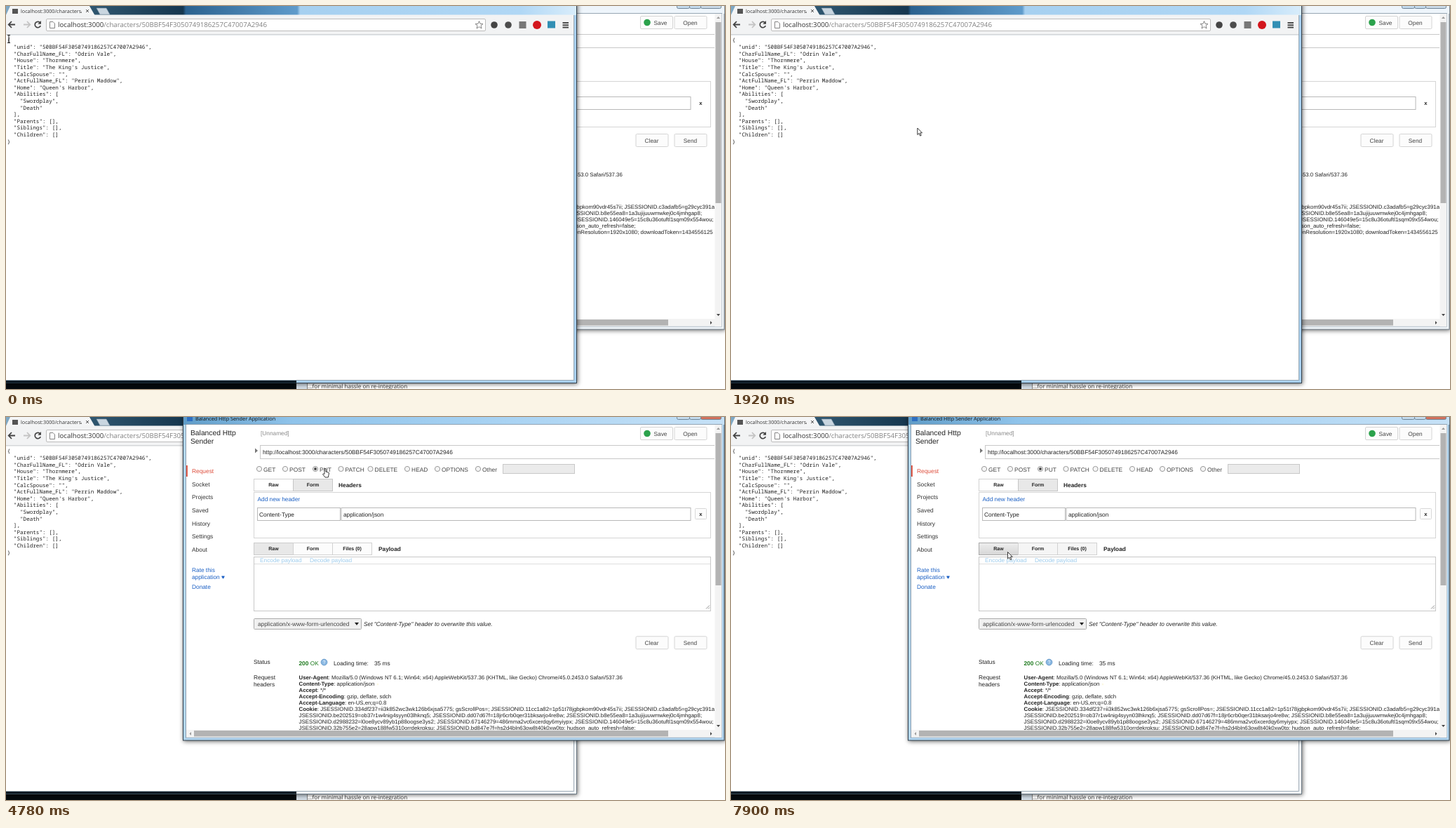
Write an HTML page that moves like this. It is 1025x546 px and loops after 7990 ms.

```html
<!DOCTYPE html>
<html lang="en">
<head>
<meta charset="utf-8">
<title>Request walkthrough</title>
<style>
html, body { margin: 0; width: 100%; height: 100%; overflow: hidden; background: #fff; }
svg { display: block; width: 100%; height: 100%; }
text { white-space: pre; text-rendering: geometricPrecision; font-family: "Liberation Sans", Arial, sans-serif; }
.ui { font-family: "Open Sans", "Noto Sans", sans-serif; }
.mono { font-family: "Noto Sans Mono", "DejaVu Sans Mono", monospace; font-weight: 500; }
.shadow { filter: drop-shadow(1px 1px 3px rgba(0,0,0,.6)); }
</style>
</head>
<body>
<svg viewBox="0 0 1025 546" xmlns="http://www.w3.org/2000/svg">
  <defs>
    <linearGradient id="strip" gradientUnits="userSpaceOnUse" x1="0" x2="814" y1="0" y2="0">
      <stop offset="0" stop-color="#7fa9c6"/><stop offset=".15" stop-color="#2f566f"/>
      <stop offset=".31" stop-color="#16374f"/><stop offset=".315" stop-color="#2b628f"/>
      <stop offset=".51" stop-color="#5f9bcb"/>
      <stop offset=".515" stop-color="#a6d0f0"/><stop offset=".9" stop-color="#b0d7f5"/>
      <stop offset="1" stop-color="#d9edfb"/>
    </linearGradient>
    <linearGradient id="titlebar">
      <stop offset="0" stop-color="#5f9cc8"/><stop offset=".2" stop-color="#8fc3ea"/>
      <stop offset=".6" stop-color="#a9d3f3"/><stop offset="1" stop-color="#c6e1f6"/>
    </linearGradient>
    <linearGradient id="pressed" x2="0" y2="1">
      <stop offset="0" stop-color="#eee"/><stop offset="1" stop-color="#d6d6d6"/>
    </linearGradient>
    <clipPath id="page"><rect x="257" y="11" width="753" height="435"/></clipPath>
    <clipPath id="tabTitle"><rect x="20" y="0" width="88" height="14"/></clipPath>
  </defs>
  <g id="desktop"></g>
  <g id="scene"></g>
  <g id="pointer"></g>
</svg>
<script>
const LOOP = 7990;
const CLIENT_RAISED = 2950, PUT_CHOSEN = 4780, RAW_HOVERED = 7560;
const BLUE = '#1a5fc4', GREY = '#444';
const ROW_TOP = 43.7, ROW_HEIGHT = 9.62, CHAR_WIDTH = 4.58;
const RECORD_ID = '50BBF54F3050749186257C47007A2946';

const json = `{
  "unid": "${RECORD_ID}",
  "CharFullName_FL": "Odrin Vale",
  "House": "Thornmere",
  "Title": "The King's Justice",
  "CalcSpouse": "",
  "ActFullName_FL": "Perrin Maddow",
  "Home": "Queen's Harbor",
  "Abilities": [
    "Swordplay",
    "Death"
  ],
  "Parents": [],
  "Siblings": [],
  "Children": []
}`.split('\n');

const requestHeaders = `User-Agent: Mozilla/5.0 (Windows NT 6.1; Win64; x64) AppleWebKit/537.36 (KHTML, like Gecko) Chrome/45.0.2453.0 Safari/537.36
Content-Type: application/json ♀
Accept: */*
Accept-Encoding: gzip, deflate, sdch
Accept-Language: en-US,en;q=0.8`.split('\n');

const cookieHeader = `Cookie: JSESSIONID.334df237=ii3k852wc3wk126b6xjsa5775; gsScrollPos=; JSESSIONID.11cc1a82=1p51t78jgbpkom90vdr45s7ii; JSESSIONID.c3adafb5=g29cyc391ar
JSESSIONID.be202519=ob37r1w4nig4syyn03lhknq5; JSESSIONID.dd07d67f=18jr6crb0qer31bksarjo4re8w; JSESSIONID.b8e55ea8=1a3ujijuuwmwkej0c4jmhgap8;
JSESSIONID.d2988232=l0oe8ycv89yb1p88oogse3ys2; JSESSIONID.67146279=486mma2vc6xcerdqy6myiypx; JSESSIONID.146049e5=15c8u36otuftl1sqm09x554wou;
JSESSIONID.32b755e2=28apw188fw5310orrdekrqksu; JSESSIONID.bd847e7f=hs2d4bln63ow8t40k0xw0tp; hudson_auto_refresh=false;
JSESSIONID.e4f45ec3=1e23uc6kb8e4o72u8xusrt2fk; JSESSIONID.46f5b8a9=nrbpydx272czkereetx1b7kz; screenResolution=1920x1080; downloadToken=1434556125`.split('\n');

const responseHeaders = `X-Powered-By: Express
Vary: Origin ♀
Access-Control-Allow-Credentials: true
Cache-Control: no-cache ♀
Pragma: no-cache ♀
Expires: -1 ♀
Date: Mon, 13 Jul 2015 18:15:44 GMT ♀
X-Content-Type-Options: nosniff
Content-Type: application/json; charset=utf-8 ♀
Content-Length: 329
ETag: W/"149-jeiFja1FI8axXI/sy0QoeQ" ♀`.split('\n');

const text = (x, y, content, size = 8.32, fill = '#222', attrs = '') =>
  `<text x="${x}" y="${y}" font-size="${size}" fill="${fill}" ${attrs}>${content}</text>`;
const bold = (x, y, content, size = 8.32, attrs = '') =>
  text(x, y, content, size, '#222', `font-weight="bold" ${attrs}`);
const rect = (x, y, w, h, fill, attrs = '') =>
  `<rect x="${x}" y="${y}" width="${w}" height="${h}" fill="${fill}" ${attrs}/>`;
const box = (x, y, w, h, fill = '#fff', stroke = '#ccc', r = 0) =>
  rect(x + .5, y + .5, w, h, fill, `stroke="${stroke}" rx="${r}"`);
const path = (d, fill = 'none', stroke = 'none', width = 1) =>
  `<path d="${d}" fill="${fill}" stroke="${stroke}" stroke-width="${width}"/>`;
const circle = (x, y, r, fill, stroke = 'none') =>
  `<circle cx="${x}" cy="${y}" r="${r}" fill="${fill}" stroke="${stroke}"/>`;

const button = (x, y, label, labelX = x + 23) =>
  box(x, y, 46, 18, '#fcfcfc', '#d4d4d4', 1.5) + text(labelX, y + 12.7, label, 8.32, GREY, 'text-anchor="middle"');
const tab = (x, y, label, fill = '#fff', stroke = '#d2d2d2') =>
  box(x, y, 56, 17, fill, stroke) + bold(x + 28.5, y + 11.4, label, 7.04, 'text-anchor="middle"');
const headerList = (lines, y, pitch, size = 7.82) => lines.map((line, i) => text(417.5, y + i * pitch, line
  .replace(/^([\w-]+):/, '<tspan font-weight="bold">$1</tspan>:')
  .replace('♀', '<tspan fill="#f1e7a0" font-size="6">♀</tspan>'), size)).join('');

function desktop() {
  return rect(0, 0, 1025, 546, '#fff') + rect(0, 0, 1025, 12, '#e6f1fa') +
    rect(0, 534, 414, 12, '#050a0e') + rect(414, 534, 15, 12, '#d3dde6') +
    path('M429.5 538V546', 'none', '#888') +
    text(430, 545, '...for minimal hassle on re-integration', 8.15, '#333', 'class="ui"');
}

// Selected rows reach the right margin; the last one ends at the given column.
function selectionRects({ row, col }) {
  if (row < 0) return '';
  return rect(2, ROW_TOP, 801.5, row * ROW_HEIGHT, '#3390ff') +
    rect(2, ROW_TOP + row * ROW_HEIGHT, col * CHAR_WIDTH, ROW_HEIGHT, '#3390ff');
}

function jsonText(fill) {
  return json.map((line, i) => text(1.7, 51.4 + i * ROW_HEIGHT, line, 7.63, fill, 'class="mono"')).join('');
}

function browser({ row, col, raised }) {
  const frame = raised ? '#f1f6fa' : '#a9d0ef';
  const selected = selectionRects({ row, col });
  return `<g class="shadow">${rect(-5, -5, 818.5, 542.5, frame, `stroke="${raised ? '#6a7680' : '#33404b'}"`)}</g>` +
    rect(0, 534, 414, 3.5, '#0b1a24') +
    rect(0, 0, 813, 13, 'url(#strip)') +
    path('M6 0H119L126.5 13H0Z', '#f4f5f6') +
    path('M129 3H143L148 12H134Z', '#c9d6e0', '#8298aa', .6) +
    rect(9, 4, 8, 7, '#555') +
    `<g clip-path="url(#tabTitle)">${text(21, 10.3, 'localhost:3000/characters/', 7.2, '#333', 'class="ui"')}</g>` +
    path('M114 5L118 9M118 5L114 9', 'none', '#555') +
    rect(0, 12.5, 810, 29, '#f2f3f4') + rect(0, 40.5, 810, 1, '#b9bcbf') +
    rect(0, 41.5, 809.5, 492, '#fff') + path('M809.5 13V533.5H0', 'none', '#8a98a5', .8) +
    path('M13 26.5H4M8 22L3.7 26.5L8 31', 'none', '#444', 1.8) +
    path('M25 26.5H34M30 22L34.3 26.5L30 31', 'none', '#c4c4c4', 1.8) +
    path('M48.8 24A4.2 4.2 0 1 0 49.3 28.2', 'none', '#444', 1.7) + path('M50 21V25.7H45.3Z', '#444') +
    box(57, 18, 626, 17, '#fff', '#bcbcbc', 1.5) +
    path('M62.5 22.5H67L69.5 25V31.5H62.5Z', '#fff', '#777', .9) +
    text(74, 30, `<tspan fill="#333">localhost:3000</tspan>/characters/${RECORD_ID}`, 9.68, '#808080', 'class="ui"') +
    path('M674.5 21.5L676 25.3L680 25.5L677 28L678 32L674.5 29.7L671 32L672 28L669 25.5L673 25.3Z', '#fff', '#777', .9) +
    circle(696, 27, 4.8, '#444') + circle(716, 27, 4.8, '#4c4c4c') + rect(731.5, 22, 10, 10, '#777') +
    circle(757, 27, 6, '#d3161d') + rect(772, 21.5, 11, 10, '#328fb4') +
    [23, 26.3, 29.6].map(y => rect(793.5, y, 8.5, 1.9, '#444')).join('') +
    jsonText('#222') + selected +
    (selected && `<clipPath id="selected">${selected}</clipPath><g clip-path="url(#selected)">${jsonText('#fff')}</g>`);
}

function payloadEditor(hovered) {
  const idle = hovered ? '#f5f5f5' : '#fcfcfc';
  return tab(353, 179, 'Raw', hovered ? 'url(#pressed)' : '#e8e8e8', hovered ? '#aaa' : '#ccc') +
    tab(409, 179, 'Form', idle) + tab(465, 179, 'Files (0)', idle) +
    bold(531, 191, 'Payload') +
    box(353, 199, 651, 77, '#fff', '#c8c8c8') + rect(354, 209, 650, 1, '#dedede') +
    text(362, 207.3, 'Encode payload', 8.32, '#9ccbec') + text(433, 207.3, 'Decode payload', 8.32, '#9ccbec') +
    path('M998 273.5L1003 268.5M1001 273.5L1003 271.5', 'none', '#777', .8) +
    box(353, 287, 153, 15, '#f0f0f0', '#aaa', 1) + text(359, 298, 'application/x-www-form-urlencoded', 8.32, GREY) +
    path('M497 293H503L500 297Z', '#222') +
    text(510, 298, 'Set "Content-Type" header to overwrite this value.', 8.32, '#222', 'font-style="italic"');
}

function statusReport() {
  return button(897.5, 182, 'Clear') + button(952.5, 182, 'Send') +
    text(353, 221.5, 'Status') +
    text(417.5, 224, '<tspan font-weight="bold">200</tspan> OK', 8.32, '#1e7a1e') +
    circle(453.5, 219.3, 4.4, '#8ab8e2', '#6c9dcc') + text(453.5, 222, '?', 7, '#fff', 'text-anchor="middle"') +
    text(467, 224, 'Loading time:') + text(525, 224, '35 ms') +
    text(353, 243.8, 'Request') + text(353, 253.3, 'headers') +
    headerList(requestHeaders, 243.4, 9.06) + headerList(cookieHeader, 288.7, 9.06, 7.89) +
    text(353, 344.7, 'Response') + text(353, 354, 'headers') +
    headerList(responseHeaders, 344, 9.48);
}

function client({ raised, put, hovered }) {
  const methods = [['GET', 361], ['POST', 398], ['PUT', 441], ['PATCH', 477.5], ['DELETE', 519.5],
    ['HEAD', 572], ['OPTIONS', 615], ['Other', 673]];
  const chosen = put ? 'PUT' : 'GET';
  const menu = ['Request', 'Socket', 'Projects', 'Saved', 'History', 'Settings', 'About'];
  const edge = raised ? '#33404b' : '#6a7680';
  return `<g class="shadow">${rect(252.5, -5, 771.5, 466, raised ? '#b3d7f2' : '#f1f6fa', `stroke="${edge}"`)}</g>` +
    rect(253, 0, 771, 11, raised ? 'url(#titlebar)' : '#eef5fb') +
    rect(258, -2, 8, 8, '#2f6fc0') + text(270, 4.6, 'Balanced Http Sender Application', 7.3, '#111', 'class="ui"') +
    box(956, -6, 18, 9, '#c3daec', '#6f8597', 2) + box(974, -6, 16, 9, '#c3daec', '#6f8597', 2) +
    box(990, -6, 29, 9, raised ? '#d2715c' : '#c9d9e6', '#6f8597', 2) +
    rect(256.5, 10.5, 764, 446.5, '#fff', 'stroke="#7f92a2" stroke-width=".8"') +
    '<g clip-path="url(#page)">' +
    text(263, 26, 'Balanced Http', 10.3) + text(263, 37.8, 'Sender', 10.3) +
    text(363, 26, '[Unnamed]', 8.32, '#8a8a8a') +
    button(904, 14, 'Save', 933) + circle(914, 23.5, 4.8, '#2ba24c') + button(952.5, 14, 'Open') +
    menu.map((item, i) => text(265, 80 + i * 18.65, item, 8.4, i ? '#333' : '#dd4b39')).join('') +
    rect(257, 69, 1.8, 16, '#dd4b39') +
    text(265, 221, 'Rate this', 8.32, BLUE) + text(265, 231, 'application ♥', 8.32, BLUE) + text(265, 245, 'Donate', 8.32, BLUE) +
    path('M355 44.5L359 48L355 51.5Z', '#777') + box(362, 40, 700, 19, '#fff', '#c8c8c8') +
    text(366, 53, `http://localhost:3000/characters/${RECORD_ID}`) +
    methods.map(([name, x]) => circle(x, 74, 3.6, '#f5f5f5', '#999') +
      (name === chosen ? circle(x, 74, 1.9, '#444') : '') + text(x + 6.1, 78, name, 8.4, GREY)).join('') +
    box(708, 67, 102, 13, put ? '#ebebeb' : '#fff', '#c8c8c8') +
    tab(353, 88, 'Raw') + tab(409, 88, 'Form', put ? '#e8e8e8' : '#fff', '#c6c6c6') + bold(474, 99.5, 'Headers') +
    box(353, 107, 651, 65, '#fff', '#d5d5d5') + text(358.5, 120, 'Add new header', 8.32, BLUE) +
    box(358, 129, 118, 18, '#fff', '#b8b8b8') + text(361, 142, 'Content-Type') +
    box(477.5, 129, 498, 18, '#fff', '#b8b8b8') + text(481, 142, 'application/json') +
    (put ? box(982, 130, 16, 15, '#fcfcfc', '#d8d8d8', 1) : '') + bold(988.3, 141, 'x', 7.6) +
    (put ? payloadEditor(hovered) : '') +
    `<g transform="translate(0 ${put ? 130.3 : 0})">${statusReport()}</g></g>` +
    rect(1010.5, 11, 10, 446, '#f3f3f3') + rect(257, 446, 763, 10.5, '#f3f3f3') +
    rect(1011.5, 23, 8, put ? 217 : 258, '#b3b3b3') + rect(268, 447, 676, 8.5, '#b3b3b3') +
    path('M1013 18H1018L1015.5 15Z', '#999') + path('M1013 439H1018L1015.5 442Z', '#444') +
    path('M264 449V454L261.5 451.5Z', '#999') + path('M1004 449V454L1006.5 451.5Z', '#444');
}

// Pointer stops: time, x, y
const route = [[0, 4, 47], [100, 4, 47], [570, 30, 179], [860, 31, 195], [960, 28, 193], [1060, 28, 193],
  [1440, 110, 173], [1730, 191, 184], [1830, 191, 184], [2680, 885, 86], [2860, 896.5, 91], [3070, 896.5, 91],
  [3590, 503, 124], [3870, 465, 166], [4130, 510, 130], [4320, 396, 86], [4500, 453, 73], [5800, 453, 73],
  [6600, 478, 212], [7430, 436, 184], [7710, 375, 188], [7900, 394, 192], [LOOP, 394, 192]];

function pointerAt(t) {
  const next = Math.max(1, route.findIndex(stop => stop[0] > t));
  const [t0, x0, y0] = route[next - 1], [t1, x1, y1] = route[next];
  const k = (t - t0) / (t1 - t0);
  return [x0 + (x1 - x0) * k, y0 + (y1 - y0) * k];
}

const pointers = {
  beam: path('M-2 -5.5H2M0 -5.5V5.5M-2 5.5H2', 'none', '#222', 1.1),
  arrow: path('M.5 .5V10L2.7 8L4.3 11.6L5.9 10.9L4.3 7.4H7.2Z', '#fff', '#222', .9),
  hand: path('M1 .8Q2 -.2 3 .8V5L6.8 6Q7.6 6.4 7.3 8L6.3 13H2L-1.5 8.6Q-1.2 7.2 1 8.3Z', '#fff', '#222', .9)
};

// The selection follows the upper half of the text pointer.
function selectionAt(t, x, y) {
  if (t < 100 || t >= 1920) return { row: -1, col: 0 };
  if (t >= 860) return { row: 15, col: 1 };
  const row = Math.max(0, Math.floor((y - 4 - ROW_TOP) / ROW_HEIGHT));
  return { row, col: Math.min(json[row].length, Math.round((x - 2) / CHAR_WIDTH)) };
}

const layer = id => document.getElementById(id);
let shownState = '', shownPointer = '';
layer('desktop').innerHTML = desktop();

function draw(now) {
  const t = now % LOOP;
  const [x, y] = pointerAt(t);
  const state = {
    ...selectionAt(t, x, y),
    raised: t >= CLIENT_RAISED, put: t >= PUT_CHOSEN, hovered: t >= RAW_HOVERED
  };
  const key = JSON.stringify(state);
  if (key !== shownState) {
    const windows = [client(state), browser(state)];
    layer('scene').innerHTML = (state.raised ? windows.reverse() : windows).join('');
    shownState = key;
  }
  const kind = t < 960 ? 'beam' : t >= 4450 && t < 5900 ? 'hand' : 'arrow';
  if (kind !== shownPointer) layer('pointer').innerHTML = pointers[shownPointer = kind];
  layer('pointer').setAttribute('transform', `translate(${x.toFixed(2)} ${y.toFixed(2)})`);
  requestAnimationFrame(draw);
}
draw(performance.now());
</script>
</body>
</html>
```
